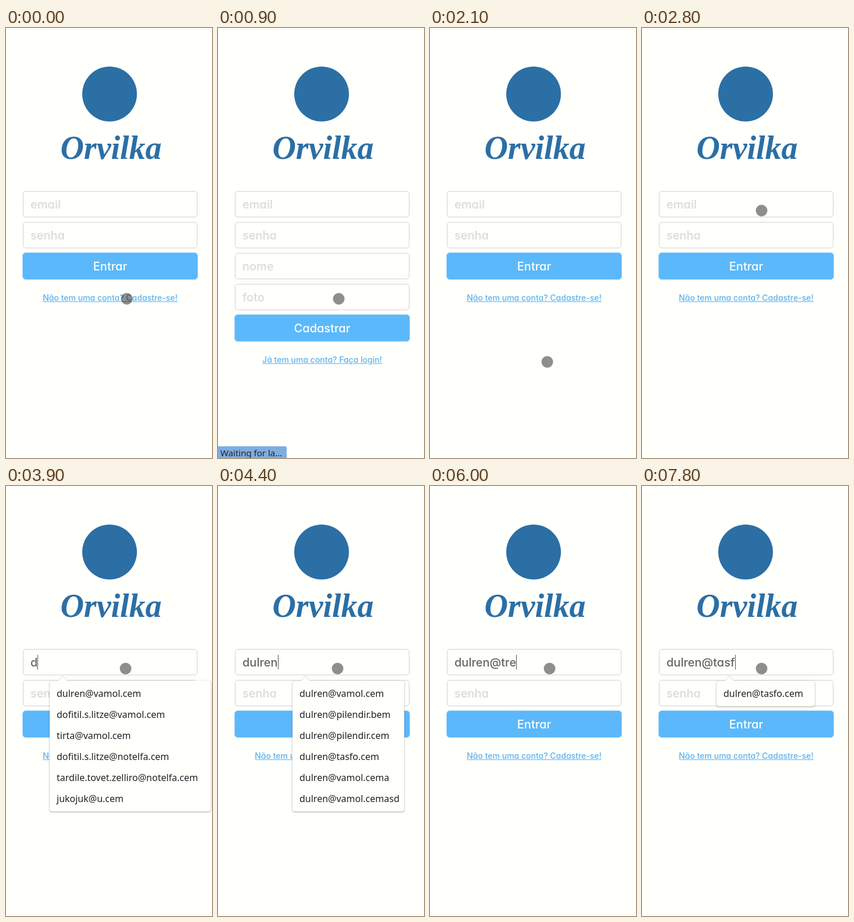
These frames come from a looping animation (354x736 px, 8000 ms). An HTML page:

```html
<!DOCTYPE html>
<html lang="pt">
<head>
<meta charset="utf-8">
<title>Login</title>
<style>
  * { box-sizing: border-box; }
  html, body { margin: 0; width: 100%; height: 100%; overflow: hidden; background: #fffffc; }
  body { position: relative; font: 500 20px/25px Inter, "Noto Sans", sans-serif; font-feature-settings: "cv11"; font-optical-sizing: none; }
  body > *, .page > * { position: absolute; }
  [hidden] { display: none !important; }
  .mark { left: 131px; top: 66px; width: 94px; height: 94px; border-radius: 50%; background: #2b6fa5; }
  .brand { left: 0; top: 170px; width: 361px; text-align: center; color: #2b6fa5; white-space: nowrap;
    font: italic bold 56px/70px "Liberation Serif", serif; }
  .field { left: 29px; width: 300px; height: 45px; display: flex; align-items: center; padding-left: 12px;
    border: 1px solid #d3d3d1; border-radius: 5px; color: #dadad8; }
  .field span { position: relative; top: 1px; }
  #typed { color: #666664; }
  #caret { width: 1px; height: 25px; margin-right: -1px; background: #555; }
  .button { left: 28px; width: 302px; height: 47px; border: 1px solid #a9d9fb; border-radius: 6px;
    background: #5bb8fa; color: #fffffc; line-height: 47px; text-align: center; }
  .link { left: 29px; width: 300px; text-align: center; font-size: 14px; line-height: 18px; color: #5ab3ee;
    text-decoration: underline 1px; white-space: nowrap; }
  #status { left: 0; top: 716px; width: 118px; height: 20px; padding-left: 4px; border-radius: 0 3px 0 0;
    background: #7faddf; color: #1d252e; font: 15px/22px "Noto Sans", sans-serif; white-space: nowrap; }
  #menu { top: 333px; padding: 4px 0; border-radius: 4px; background: #fffffc; color: #202124;
    font: 16px/36px "Noto Sans", sans-serif; white-space: nowrap; box-shadow: 0 1px 3px #0005, 0 0 1px #0003; }
  #menu::before { content: ""; position: absolute; left: 14px; top: -8px; width: 16px; height: 9px;
    background: #fffffc; clip-path: polygon(50% 0, 100% 100%, 0 100%); }
  #menu::after { content: ""; position: absolute; left: 16px; top: -6px; width: 12px; height: 12px;
    border: solid #d9d9d7; border-width: 1px 0 0 1px; transform: rotate(45deg); clip-path: polygon(0 0, 100% 0, 0 100%); }
  #menu div { padding-left: 12px; }
  #pointer { left: -10px; top: -10px; width: 20px; height: 20px; border-radius: 50%; background: #00000071; }
</style>
</head>
<body>
<div class="mark"></div>
<div class="brand">Orvilka</div>
<div class="field" style="top:279px"><span id="typed"></span><i id="caret"></i><span id="hint">email</span></div>
<div class="field" style="top:332px"><span>senha</span></div>
<div class="page" id="login">
  <div class="button" style="top:384px">Entrar</div>
  <div class="link" style="top:453px">Não tem uma conta? Cadastre-se!</div>
</div>
<div class="page" id="signup">
  <div class="field" style="top:385px"><span>nome</span></div>
  <div class="field" style="top:438px"><span>foto</span></div>
  <div class="button" style="top:490px">Cadastrar</div>
  <div class="link" style="top:559px">Já tem uma conta? Faça login!</div>
</div>
<div id="status">Waiting for la…</div>
<div id="menu"></div>
<div id="pointer"></div>
<script>
const LOOP = 8000;
const $ = id => document.getElementById(id);

const user = 'dulren@';
const menus = {
  all: { left: 75, width: 277, rows: [user + 'vamol.cem', 'dofitil.s.litze@vamol.cem', 'tirta@vamol.cem',
    'dofitil.s.litze@notelfa.cem', 'tardile.tovet.zelliro@notelfa.cem', 'jukojuk@u.cem'] },
  user: { left: 128, width: 192, rows: ['vamol.cem', 'pilendir.bem', 'pilendir.cem', 'tasfo.cem',
    'vamol.cema', 'vamol.cemasd'].map(domain => user + domain) },
  match: { left: 128, width: 169, rows: [user + 'tasfo.cem'] }
};

// Each track lists [start in ms, value]; a value holds until the next one.
const tracks = {
  page: [[0, 'login'], [900, 'signup'], [2100, 'login']],
  status: [[0, false], [900, true], [1300, false]],
  caret: [[0, false], [3100, true], [3600, false], [3900, true], [5000, false], [5400, true],
    [6400, false], [7000, true], [7500, false], [7600, true]],
  menu: [[0, ''], [3100, 'all'], [4200, 'user'], [6000, ''], [6600, 'match']],
  text: [[0, ''], ...[...user.slice(0, 6)].map((_, i) => [3900 + i * 100, user.slice(0, i + 1)]),
    [5400, user], [5700, user + 't'], [5800, user + 'tr'], [5900, user + 'tre'],
    [6600, user + 't'], [7000, user + 'ta'], [7600, user + 'tas'], [7800, user + 'tasf']],
  pointer: [[0, [207.5, 463.5]], [1300, [207, 490]], [1400, [203, 543]], [1500, [201.5, 571.5]],
    [2200, [198, 486.5]], [2400, [196, 430]], [2500, [197, 372]], [2600, [200, 332]],
    [2700, [204, 311]], [2800, [205.5, 312.5]]]
};

const valueAt = (track, t) => track.findLast(([start]) => start <= t)[1];

let shownMenu;
function showMenu(name) {
  if (name === shownMenu) return;
  shownMenu = name;
  const menu = $('menu');
  menu.hidden = !name;
  if (!name) return;
  const { left, width, rows } = menus[name];
  menu.style.left = left + 'px';
  menu.style.width = width + 'px';
  menu.innerHTML = rows.map(row => `<div>${row}</div>`).join('');
}

function render(t) {
  const now = name => valueAt(tracks[name], t);
  const text = now('text'), [x, y] = now('pointer');
  $('login').hidden = now('page') !== 'login';
  $('signup').hidden = now('page') !== 'signup';
  $('status').hidden = !now('status');
  $('typed').textContent = text;
  $('hint').hidden = text !== '';
  $('caret').style.opacity = now('caret') ? 1 : 0;
  showMenu(now('menu'));
  $('pointer').style.transform = `translate(${x}px, ${y}px)`;
}

const begin = performance.now();
function tick() {
  render(Math.max(0, performance.now() - begin) % LOOP);
  requestAnimationFrame(tick);
}
tick();
</script>
</body>
</html>
```
